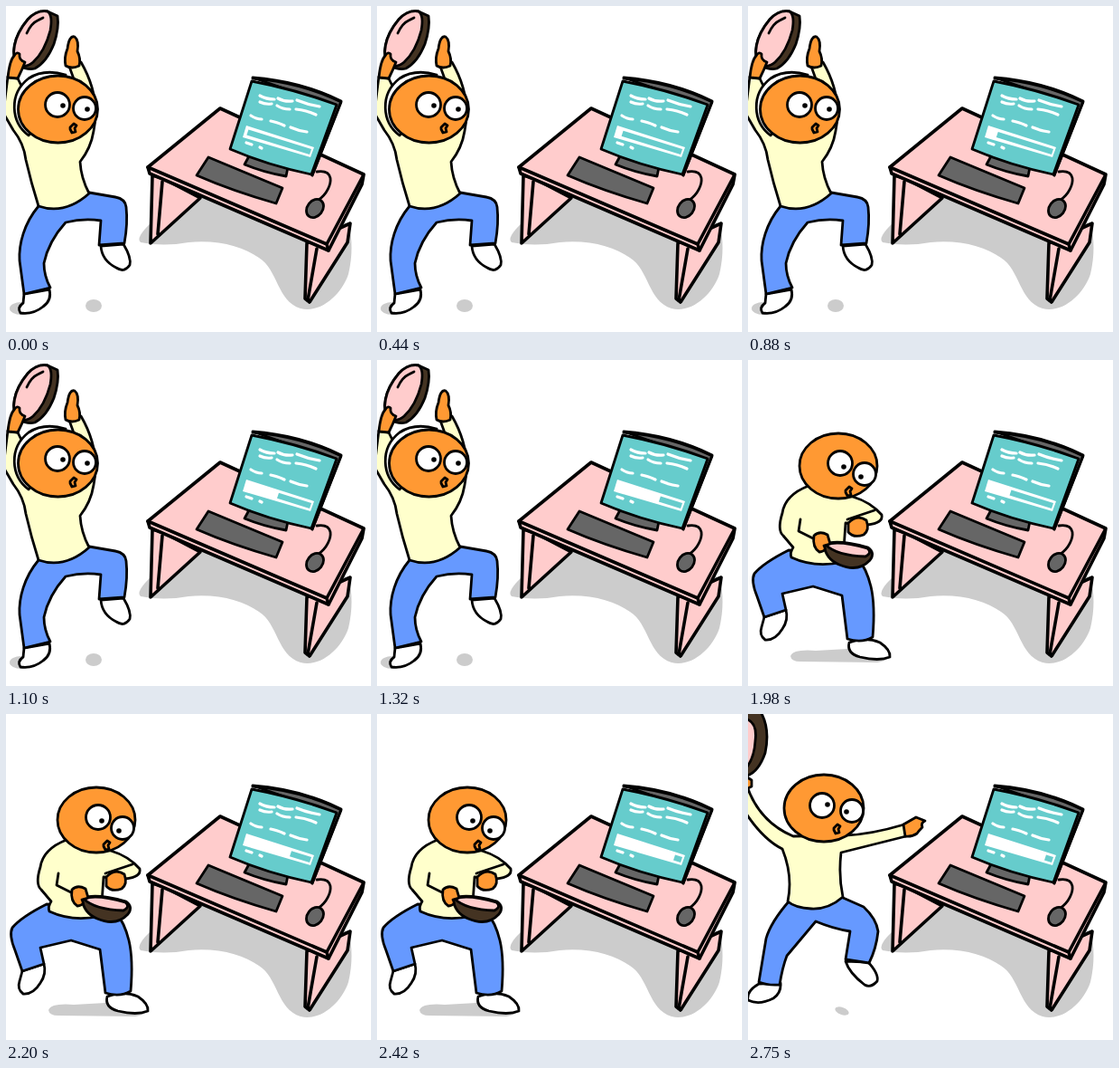
Animation, 404 px wide and 360 px high, one loop 2.86 s. Source, as an HTML page:

```html
<!DOCTYPE html>
<html lang="en">
<head>
<meta charset="utf-8">
<title>Waiting for the progress bar</title>
<style>
  html, body { margin: 0; width: 100%; height: 100%; overflow: hidden; background: #fff; }
  svg { display: block; width: 100vw; height: 100vh; }
  path, ellipse, circle { stroke: #000; stroke-width: 2.8; stroke-linejoin: round; stroke-linecap: round; }
  #desk > .wood { stroke-width: 3.6; }
  .line { fill: none; }
  .flat { stroke: none; }
  .shade { fill: #ccc; stroke: none; }
  .pink { fill: #fcc; }
  .grey { fill: #666; }
  .teal { fill: #66cccc; }
  .skin { fill: #f93; }
  .shirt { fill: #ffc; }
  .jeans { fill: #69f; }
  .white { fill: #fff; }
  .pan { fill: #432; }
  .text { fill: none; stroke: #fff; stroke-width: 3.2; }
</style>
</head>
<body>
<svg viewBox="0 0 404 360">
  <g id="desk">
    <path class="shade" d="M160 240Q143 256 149 261Q174 266 202 261C236 258 262 266 280 278C301 291 300 326 326 334C348 340 372 318 379 296Q386 266 379 240L215 208Z"/>
    <path class="wood pink" d="M162 187L160 262L215 212L173 190Z"/>
    <path class="wood line" d="M173 194L168 252"/>
    <path class="wood pink" d="M333 262L331 323L336 327L378 261L381 240Z"/>
    <path class="wood line" d="M344 268L334 325"/>
    <path class="wood pink" d="M157 178L237 113L396 186L394 197L357 270L159 185Z"/>
    <path class="wood line" d="M157 178L355 263L395 188M355 263L357 270"/>
    <path class="grey" d="M224 167L306 201L299 218Q250 204 211 187Z"/>
    <path class="line" d="M346 214C355 208 360 197 359 190Q357 181 344 183"/>
    <ellipse class="grey" cx="342" cy="223.5" rx="8.5" ry="11" transform="rotate(38 342 223.5)"/>
    <path class="grey" d="M270 164L312 178L310 188Q286 184 264 175Z"/>
    <path class="grey" d="M273 79Q326 83 371 105L339 187L335 184L362 110Z"/>
    <path class="teal" d="M272 83Q320 92 366 109L338 186Q290 176 248 158Z" stroke-width="2"/>
    <path class="line" d="M273 80Q326 84 371 106L339 187" stroke-width="4"/>
    <path class="text" d="M281 99Q288 103 297 103M301 102Q308 106 317 105M322 104Q334 109 347 111M281 106Q287 109 294 108M300 110Q306 114 314 114M321 114Q332 115 343 120M271 121Q277 125 283 125M293 127Q299 128 308 132M315 134Q324 138 333 139M266 151L272 153M281 156L283 157"/>
    <path class="white flat" d="M266 132L341 156L337 167L262 145Z"/>
    <path id="rest" class="teal flat"/>
  </g>

  <g id="raised">
    <ellipse class="shade" cx="97" cy="331" rx="9" ry="7"/>
    <ellipse class="shade" cx="17" cy="334" rx="13" ry="7"/>
    <path class="white" d="M20 318L48 313Q51 325 41 332Q30 341 16 339Q12 333 19 328Z"/>
    <path class="white" d="M105 265L130 263Q139 278 137 286Q131 295 122 289Q106 281 105 265Z"/>
    <path class="jeans" d="M36 221C20 240 14 263 15 281L20 318L49 311Q42 298 42 284Q47 260 66 239Q86 234 105 237L103 264L131 262Q135 240 133 222Q132 213 121 211L92 206Z"/>
    <path class="shirt" d="M2 78L13 80L40 135L82 137Q84 100 69 64L83 62Q105 100 97 138Q94 157 82 172Q83 190 92 207Q65 231 36 221Q28 196 22 170Q20 152 8 137L-3 118Z"/>
    <path class="white" d="M66 76Q42 69 25 80C3 97 5 128 25 143Z" stroke-width="1.5"/>
    <path class="skin" d="M66 66Q64 57 68 47Q70 32 76 34Q81 38 79 50Q83 58 81 66Q73 70 66 66Z"/>
    <path class="pan" d="M14 66C4 55 8 34 24 15Q34 4 46 6L57 11Q59 24 53 42Q45 62 32 69Q24 71 14 66Z"/>
    <path class="pink" d="M13 65C5 55 8 34 24 15Q34 4 46 6Q52 10 49 27Q43 50 30 62Q22 69 13 65Z" stroke-width="2"/>
    <path class="line" d="M23 30Q28 19 35 16L41 13"/>
    <path class="skin" d="M2 79Q4 60 9 55Q12 50 15 53Q14 60 21 62Q18 70 13 80Z"/>
    <ellipse class="skin" cx="57.5" cy="114" rx="44" ry="37"/>
    <g data-face="57 109 63 110 87 113 90 114 74 135"></g>
  </g>

  <g id="swing">
    <ellipse class="shade" cx="104" cy="328" rx="8" ry="4" transform="rotate(20 104 328)"/>
    <path class="white" d="M12 298L36 297Q37 308 28 314Q12 322 0 316Q-2 306 12 298Z"/>
    <path class="white" d="M108 273L133 274Q145 287 143 295Q136 303 129 299Q112 286 108 273Z"/>
    <path class="jeans" d="M46 206Q25 230 20 248L12 296Q22 300 35 299Q38 280 43 267L75 229Q94 237 113 240L108 271L134 275Q142 259 144 240Q142 226 128 213L103 202Z"/>
    <path class="shirt" d="M-3 74Q10 118 50 135L108 134Q136 133 173 122L175 135Q139 144 103 153Q100 179 105 202Q89 216 70 215Q52 214 44 207Q50 179 38 149Q16 138 -4 107Z"/>
    <path class="skin" d="M172 122L186 114L196 118Q191 120 193 125Q189 129 187 132Q181 136 174 135Z"/>
    <path class="skin" d="M-4 68L4 73L4 80L-4 84Z"/>
    <path class="pan" d="M-4 -4H13Q25 15 19 43Q11 66 -4 69Z"/>
    <path class="pink" d="M-4 5Q11 8 8 30Q7 50 -4 62Z" stroke-width="2"/>
    <ellipse class="skin" cx="84" cy="104" rx="44" ry="37"/>
    <g data-face="82 101 88 100 115 107 109 108 98 127"></g>
  </g>

  <g id="lowered">
    <path class="shade" d="M47 327Q50 319 75 321L110 319L156 322Q159 331 143 334L58 333Q48 333 47 327Z"/>
    <path class="white" d="M18 284L42 276Q45 287 38 297Q30 310 19 309Q12 304 15 295Z"/>
    <path class="white" d="M112 312Q130 305 146 312Q158 320 157 328Q145 333 124 328Q109 324 112 312Z"/>
    <path class="jeans" d="M45 210Q17 224 7 236Q3 244 10 261L18 284L42 276L38 258L72 250L104 260L110 308Q126 313 138 306Q141 271 136 250Q131 230 122 220Z"/>
    <path class="shirt" d="M67 139Q41 149 38 169Q32 188 39 194L50 207Q46 213 48 218Q74 230 105 223L108 180L132 182Q150 180 148 171Q136 157 116 151Z"/>
    <path class="line" d="M58 176L56 189L76 199M140 166L110 176"/>
    <path class="skin" d="M111 180Q121 170 131 177Q135 188 128 193Q117 197 111 190Z"/>
    <path class="pan" d="M84 204Q97 197 133 207Q141 213 135 221Q122 235 101 226Q86 220 84 204Z"/>
    <path class="pink" d="M86 204Q101 199 132 208Q138 213 130 217Q98 216 86 204Z" stroke-width="2"/>
    <path class="skin" d="M73 194Q79 188 88 193L91 203L84 205Q88 211 79 212Q71 207 73 194Z"/>
    <ellipse class="skin" cx="100" cy="117" rx="43" ry="36"/>
    <g data-face="102 114 106 118 129 126 125 129 111 145"></g>
  </g>
</svg>
<script>
const LOOP = 2860;
const poses = [[0, 'raised'], [1430, 'swing'], [1540, 'lowered'], [2750, 'swing']];
const progress = [
  [0, .02], [220, .05], [440, .08], [660, .11], [880, .14], [990, .25], [1100, .5], [1320, .67],
  [1430, .85], [1540, .1], [1760, .2], [1980, .35], [2090, .5], [2200, .7], [2420, .9]
];
const byId = id => document.getElementById(id);
const at = (steps, t) => steps.filter(step => step[0] <= t).pop()[1];

// Two eyes, two pupils and a small open mouth.
for (const face of document.querySelectorAll('[data-face]')) {
  const [x1, y1, px1, py1, x2, y2, px2, py2, mx, my] = face.dataset.face.split(' ').map(Number);
  const eye = (x, y, px, py, r) =>
    `<circle class="white" cx="${x}" cy="${y}" r="${r}" stroke-width="2"/>
     <circle class="flat" cx="${px}" cy="${py}" r="2.8"/>`;
  face.innerHTML = eye(x1, y1, px1, py1, 13.5) + eye(x2, y2, px2, py2, 12.5) +
    `<path class="line" d="M${mx - 3} ${my - 1}l4 -4l3 2l-2 3l1 4l-4 1l-2 -4z"/>`;
}

function draw(now) {
  const t = now % LOOP;
  const pose = at(poses, t);
  for (const [, id] of poses) byId(id).style.display = id === pose ? '' : 'none';

  // The unfilled part of the bar, along its slanted axis.
  const x = 267 + 70 * at(progress, t);
  const slope = .31;
  const y = 136 + (x - 267) * slope;
  byId('rest').setAttribute('d', `M${x} ${y}L338 ${136 + 71 * slope}l-2 6L${x - 2} ${y + 6}Z`);
  requestAnimationFrame(() => draw(performance.now()));
}
draw(0);
</script>
</body>
</html>
```
